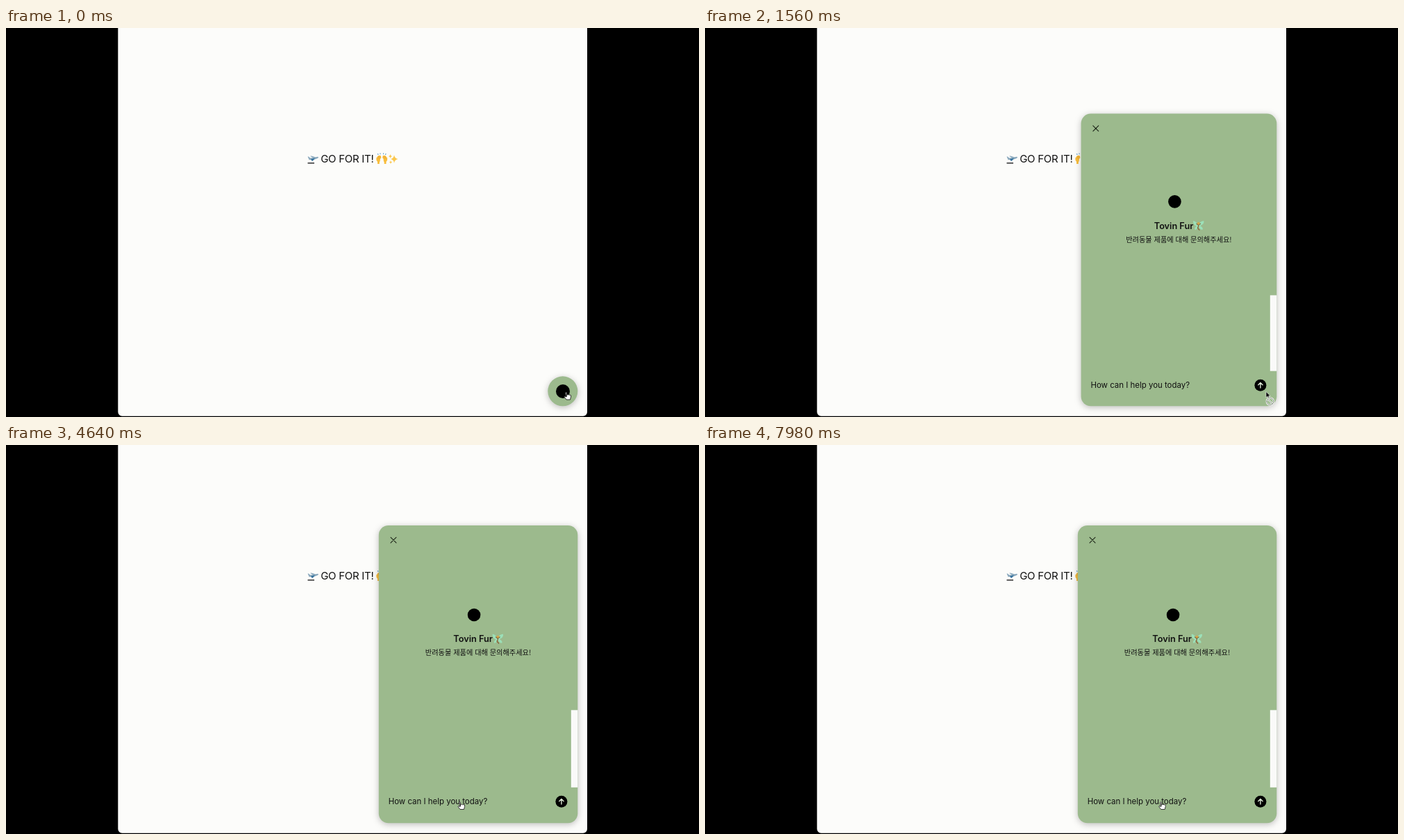
An HTML page for the animation above (8 s loop, 998 px wide and 561 px high).

```html
<!DOCTYPE html>
<html lang="ko">
<head>
<meta charset="utf-8">
<title>Chat panel</title>
<style>
  html, body { margin: 0; width: 100%; height: 100%; overflow: hidden; background: #000; }
  svg { display: block; }
  text { font-family: Inter, Roboto, sans-serif; fill: #111; }
  #card { fill: #9cba8d; filter: drop-shadow(0 2px 5px rgba(0, 0, 0, .25)); }
  .line { fill: none; stroke-linecap: round; stroke-linejoin: round; }
</style>
</head>
<body>
<svg width="100%" height="100%" viewBox="0 0 998 561">
  <path d="M161.300 0H837V553.700a6 6 0 0 1-6 6H167.300a6 6 0 0 1-6-6Z" fill="#fcfcfa"/>

  <!-- headline with its small pictures -->
  <g transform="translate(434 181)">
    <path d="M.5 13.800H10" stroke="#4a4a4a" stroke-width="1.800"/>
    <path d="M.5 4.500L2 4.500 4 6.500 8 6.300 4 3.800 6 3.500 11.500 5.300C14 4.500 16 4.500 16 5.700 15.500 7 11 8.500 6 9.300L2.500 9Z" fill="#8ba9bd"/>
    <path d="M5 8L11 6.800 8 10.500 6.500 10.700Z" fill="#33709c"/>
  </g>
  <text x="453.200" y="194" font-size="15" letter-spacing="-.28">GO FOR IT!</text>
  <g transform="translate(533 180)">
    <g id="hand" fill="#f8bd3c">
      <path d="M2 16V13L.4 10.500V7L1.500 6.500 2.500 4.500 4 4 5.500 3.800 7 4.500 7.300 7.500 6 8.500 5.600 12 4.800 13.500V16Z"/>
      <path class="line" d="M3 5.500V8M5 5V8" stroke="#dd952c" stroke-width=".5"/>
    </g>
    <use href="#hand" transform="translate(16.500 0) scale(-1 1)"/>
    <path class="line" d="M3 2.500L2.500 1.500M6 1.800V.8M10.500 1.800V.8M13.500 2.500L14 1.500" stroke="#5d9fca" stroke-width="1.100"/>
  </g>
  <g transform="translate(550 181)" fill="#fbc74c">
    <path d="M9 2Q9.500 7 14.500 8 9.500 9 9 14 8.500 9 4 8 8.500 7 9 2Z"/>
    <path d="M3.500 1Q3.700 3.500 6 4 3.700 4.500 3.500 7 3.300 4.500 1 4 3.300 3.500 3.500 1ZM4 10Q4.200 12 6 12.500 4.200 13 4 15 3.800 13 2 12.500 3.800 12 4 10Z"/>
  </g>

  <rect id="card"/>
  <svg id="panel">
    <path class="line" d="M17.200 17.200l8 8m0-8l-8 8" stroke="#182014" stroke-width="1.050"/>
    <g id="content">
      <g id="intro">
        <circle cx="-6" cy="0" r="9.300"/>
        <text x="-35.700" y="39.500" font-size="12.700" font-weight="600">Tovin Fur</text>
        <g transform="translate(20.500 27)">
          <path d="M7.500 7Q3 0 0 1 0 7 5 8.500 1 11 3 14 6 13 8 9 11 15 14 13 14 10 10 8 16 6 15.500 1 11 0 7.500 7Z" fill="#9be0b8"/>
          <path class="line" d="M5 5L7.500 7 10.500 5M8 8L6.500 11 9 14" stroke="#896036" stroke-width="1.300"/>
          <circle cx="7.800" cy="4.500" r="1.800" fill="#d5a647"/>
        </g>
        <text x="0" y="58.500" text-anchor="middle" font-size="10.200" style="font-family:'Noto Sans CJK KR','Noto Sans CJK',sans-serif">반려동물 제품에 대해 문의해주세요!</text>
      </g>
      <rect id="bar" width="12" fill="#fafaf9"/>
      <g id="entry">
        <text x="13.900" y="4" font-size="11.450">How can I help you today?</text>
        <path id="caret" d="M14.800 -6.500V6.500" stroke="#222" stroke-width="1"/>
      </g>
      <g id="send">
        <circle r="8.500"/>
        <path class="line" d="M0 3.800V-3.500M-3.200 -.5L0 -3.700 3.200 -.5" stroke="#dce8d5" stroke-width="1.400"/>
      </g>
    </g>
  </svg>
  <circle id="logo" cx="802" cy="524" r="10"/>

  <g id="cursor">
    <path id="pointer" class="line" d="M-1.500 1V-4.500Q-2.300 -6 -3.200 -4.500L-2.500 1.500 -4.500 .5Q-5.500 1 -4.500 2.200L-2 5.500H3.500L4.500 1.500V-.8Q3.800 -1.800 3 -.8 2.500 -2.200 1.300 -1.200 .5 -2.500 -.5 -1.500L-1.500 -1.500" style="fill:#fff" stroke="#222" stroke-width=".9"/>
    <g id="blocked">
      <path d="M-2 -6.500V2L0 .2 1.500 3.500 3 2.800 1.500 -.3 4 -.5Z" fill="#000" stroke="#fff" stroke-width=".6"/>
      <g class="line">
        <path d="M-1.200 7.500a5 5 0 1 0 10 0a5 5 0 1 0 -10 0M.3 4L7.300 11" stroke="#fff" stroke-width="2.400"/>
        <path d="M-1.200 7.500a5 5 0 1 0 10 0a5 5 0 1 0 -10 0M.3 4L7.300 11" stroke="#7d8979" stroke-width="1"/>
      </g>
    </g>
  </g>
</svg>

<script>
const LOOP = 8000, RIGHT = 823.3, BOTTOM = 545.3;
const OPEN_AT = 964, OPEN_FOR = 669;
const $ = id => document.getElementById(id);
const clamp = v => Math.max(0, Math.min(1, v));
const mix = (a, b, k) => a + (b - a) * k;
const set = (id, attrs) => {
  for (const name in attrs) $(id).setAttribute(name, attrs[name]);
};
const move = (id, x, y) => set(id, { transform: `translate(${x} ${y})` });
const show = (id, on) => { $(id).style.display = on ? '' : 'none'; };

// cubic-bezier(0, 0, .58, 1)
function easeOut(x) {
  let lo = 0, hi = 1;
  for (let i = 0; i < 24; i++) {
    const s = (lo + hi) / 2;
    if (1.74 * s * s - .74 * s ** 3 < x) lo = s; else hi = s;
  }
  return lo * lo * (3 - 2 * lo);
}

// time, x, y of the cursor
const path = [
  [0, 809, 530.5], [980, 810, 531], [2700, 810, 531], [3300, 661, 523.5],
  [4000, 661, 523.5], [4400, 656, 520], [6460, 656, 520], [6720, 658.7, 520], [LOOP, 658.7, 520]
];
function cursorAt(t) {
  const i = path.findIndex(p => p[0] > t);
  const [t0, x0, y0] = path[i - 1], [t1, x1, y1] = path[i];
  const k = (t - t0) / (t1 - t0), e = k * k * (3 - 2 * k);
  return [mix(x0, x1, e), mix(y0, y1, e)];
}

function draw(t) {
  const p = easeOut(clamp((t - OPEN_AT) / OPEN_FOR));
  const w = mix(43, 286.5, p), h = mix(43, 429.3, p);
  const box = { x: RIGHT - w, y: BOTTOM - h, width: w, height: h };
  set('card', { ...box, rx: mix(21.5, 14, clamp(p * 25)) });
  set('panel', box);
  show('panel', p > 0);
  show('logo', p === 0);

  $('content').style.opacity = clamp((p - .15) / .35);
  move('intro', w / 2, 3.2 + h * .293);
  set('bar', { x: w - 9.5, y: 14.3 + h * .587, height: Math.max(0, h * .293 - 14.3) });
  move('entry', 0, h * .88 + 20.5);
  move('send', w - 23.4, h * .88 + 20.5);
  show('caret', (t > 4660 && t < 5180) || (t > 5660 && t < 6180));

  const blocked = t > 1150 && t < 2750;
  move('cursor', ...cursorAt(t));
  show('pointer', !blocked);
  show('blocked', blocked);
}

const start = performance.now();
function tick() {
  draw((performance.now() - start) % LOOP);
  requestAnimationFrame(tick);
}
tick();
</script>
</body>
</html>
```
